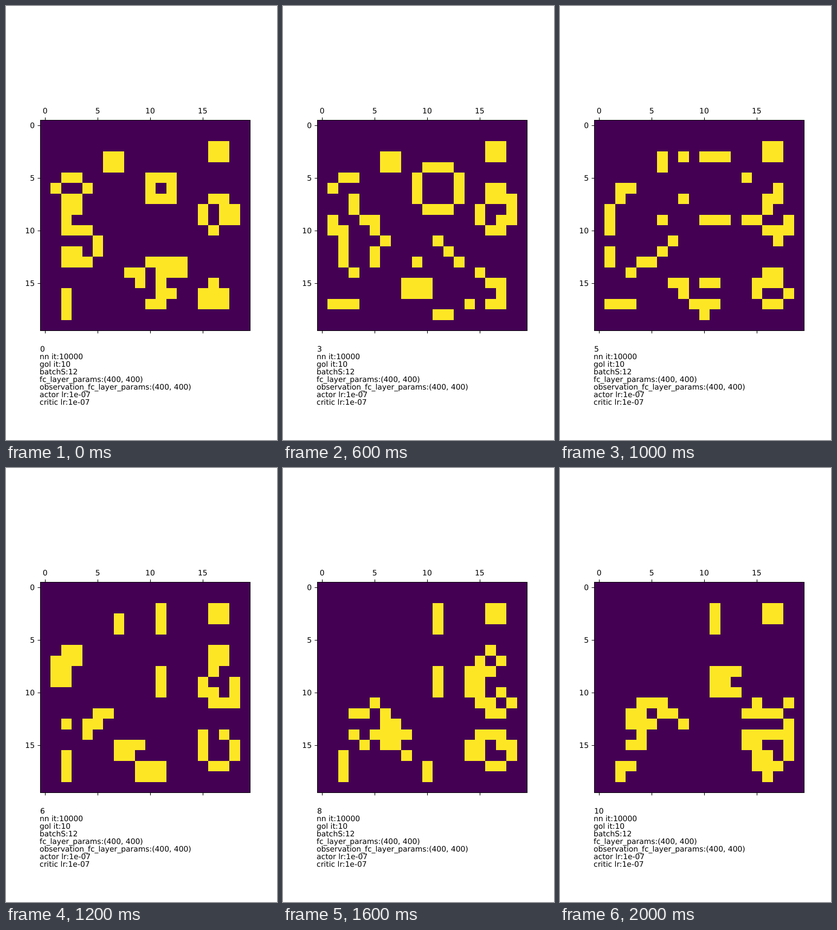
An HTML page for the animation above (8000 ms loop, 500 by 800 pixels).

```html
<!DOCTYPE html>
<html lang="en">
<head>
<meta charset="utf-8">
<title>Game of life</title>
<style>
  html, body { margin: 0; width: 100%; height: 100%; overflow: hidden; background: #fff; }
  svg { display: block; }
  text { font: 13.89px "DejaVu Sans", sans-serif; text-rendering: geometricPrecision; white-space: pre; }
</style>
</head>
<body>
<svg id="plot" width="500" height="800" viewBox="0 0 500 800">
  <rect x="63" y="210" width="388" height="388" fill="#440154"/>
  <path id="cells" fill="#fde725" shape-rendering="crispEdges"/>
  <path id="axes" fill="none" stroke="#000" stroke-width="1.11" stroke-linecap="butt"/>
  <text id="step" x="63" y="637"></text>
</svg>
<script>
const SIZE = 20, CELL = 19.4, STEP_MS = 200, STEPS = 10, LOOP_MS = 8000;
const $ = id => document.getElementById(id);

// One group per row; each character is a live column in base 36.
const seed = "//gh/67gh/67/23abc/14ac/23abcgh/23fhi/2fhi/234g/5/235/234abcd/89bcd/9bg/2bcfgh/2abfgh/2/";
const makeGrid = alive => Array.from({ length: SIZE }, (_, r) =>
  Array.from({ length: SIZE }, (_, c) => +alive(r, c)));

function evolve(grid) {
  const inside = i => i > 0 && i < SIZE - 1;   // border cells stay dead
  return makeGrid((r, c) => {
    if (!inside(r) || !inside(c)) return false;
    let n = -grid[r][c];
    for (let y = r - 1; y <= r + 1; y++)
      for (let x = c - 1; x <= c + 1; x++) n += grid[y][x];
    return n === 3 || (n === 2 && grid[r][c]);
  });
}

function cellPath(grid) {
  const edge = (origin, i) => Math.round(origin + i * CELL);
  let d = "";
  grid.forEach((row, r) => row.forEach((on, c) => {
    if (on) d += `M${edge(63, c)} ${edge(210, r)}H${edge(63, c + 1)}V${edge(210, r + 1)}H${edge(63, c)}Z`;
  }));
  return d;
}

function addText(x, y, text, anchor = "start") {
  const el = document.createElementNS("http://www.w3.org/2000/svg", "text");
  el.setAttribute("x", x);
  el.setAttribute("y", y);
  el.setAttribute("text-anchor", anchor);
  el.textContent = text;
  $("plot").append(el);
}

let axes = "M63.5 210.5H450.5V598.5H63.5Z";
for (let i = 0; i < SIZE; i += 5) {
  const offset = (i + 0.5) * 19.375;
  const x = Math.round(62.5 + offset) + 0.5, y = Math.round(210.25 + offset) + 0.5;
  axes += `M${x} 210.5v-5M${x} 598.5v5M63.5 ${y}h-5`;
  addText(62.5 + offset, 198, i, "middle");
  addText(53, Math.floor(y) + 5, i, "end");
}
$("axes").setAttribute("d", axes);

["nn it:10000", "gol it:10", "batchS:12", "fc_layer_params:(400, 400)",
 "observation_fc_layer_params:(400, 400)", "actor lr:1e-07", "critic lr:1e-07"]
  .forEach((line, i) => addText(62, 651 + 14 * i, line));

const rows = seed.split("/");
let grid = makeGrid((r, c) => rows[r].includes(c.toString(36)));
const paths = [];
for (let i = 0; i <= STEPS; i++) {
  paths.push(cellPath(grid));
  grid = evolve(grid);
}

let shown = -1;
function draw() {
  const step = Math.min(STEPS, Math.floor(performance.now() % LOOP_MS / STEP_MS));
  if (step !== shown) {
    shown = step;
    $("cells").setAttribute("d", paths[step]);
    $("step").textContent = step;
  }
  requestAnimationFrame(draw);
}
draw();
</script>
</body>
</html>
```
